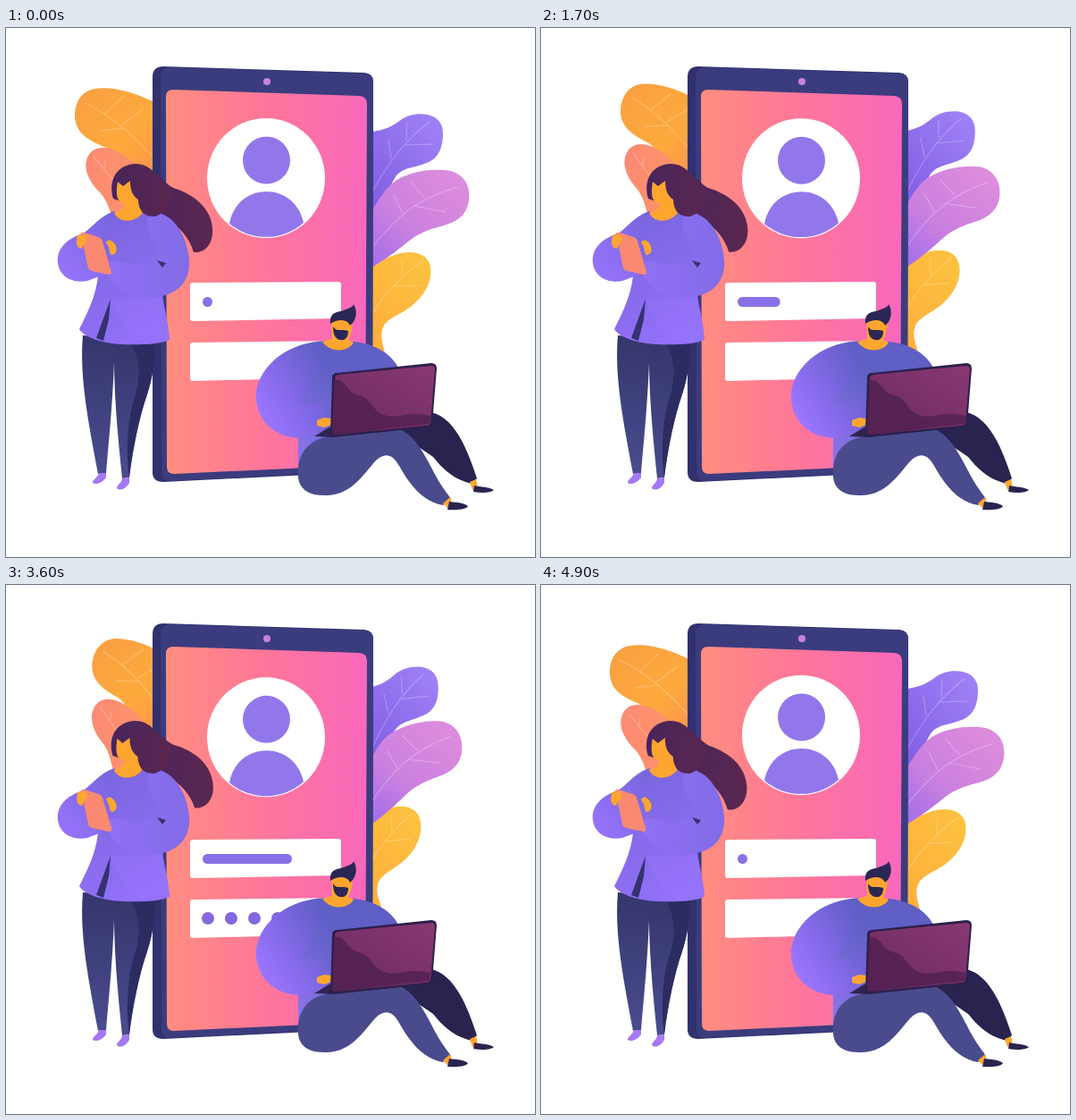
Write an HTML page that moves like this. It is 592 px wide and 592 px high and loops after 5000 ms.

```html
<!DOCTYPE html>
<html lang="en">
<head>
<meta charset="utf-8">
<title>Sign in</title>
<style>
html, body { margin: 0; width: 100%; height: 100%; overflow: hidden; background: #fff; }
svg { display: block; width: 100vw; height: 100vh; }
.vein { fill: none; stroke: #fff; stroke-opacity: .28; stroke-width: 1; stroke-linecap: round; }
.skin { fill: #fca62f; }
</style>
</head>
<body>
<svg viewBox="0 0 592 592">
<defs>
  <linearGradient id="screen"><stop stop-color="#ff8d7f"/><stop offset=".5" stop-color="#ff769b"/><stop offset="1" stop-color="#f968bc"/></linearGradient>
  <linearGradient id="orange" x2="1" y2="1"><stop stop-color="#f99f42"/><stop offset=".55" stop-color="#fdaa3c"/><stop offset="1" stop-color="#ff8b52"/></linearGradient>
  <linearGradient id="coral"><stop stop-color="#fb8a74"/><stop offset="1" stop-color="#ff9862"/></linearGradient>
  <linearGradient id="violet" x1="0" y1="1" x2="1" y2="0"><stop stop-color="#7856df"/><stop offset="1" stop-color="#a284f8"/></linearGradient>
  <linearGradient id="pink" x1="0" y1="1" x2="1" y2="0"><stop stop-color="#9668ee"/><stop offset=".45" stop-color="#cb80df"/><stop offset="1" stop-color="#e08fdc"/></linearGradient>
  <linearGradient id="yellow" x1="0" y1="1" x2="1" y2="0"><stop stop-color="#ffac3b"/><stop offset="1" stop-color="#fcc340"/></linearGradient>
  <linearGradient id="hair"><stop stop-color="#48245c"/><stop offset="1" stop-color="#5a274f"/></linearGradient>
  <linearGradient id="trousers" x2="0" y2="1"><stop stop-color="#35366d"/><stop offset="1" stop-color="#494c8e"/></linearGradient>
  <linearGradient id="blouse" x2=".4" y2="1"><stop stop-color="#7865db"/><stop offset="1" stop-color="#9270f8"/></linearGradient>
  <linearGradient id="sleeve" x1="1" x2="0" y2="1"><stop stop-color="#7664dc"/><stop offset="1" stop-color="#9a74ff"/></linearGradient>
  <linearGradient id="forearm"><stop stop-color="#9070f6"/><stop offset="1" stop-color="#826ce6"/></linearGradient>
  <linearGradient id="body" x1="0" y1="1" x2=".5" y2=".3"><stop stop-color="#9377f2"/><stop offset="1" stop-color="#5f5fc5"/></linearGradient>
  <linearGradient id="arm" x1=".1" y1=".8" x2=".9" y2=".2"><stop stop-color="#9b75ff"/><stop offset=".5" stop-color="#8068e4"/><stop offset="1" stop-color="#605fc6"/></linearGradient>
  <linearGradient id="laptop" x1="0" y1="1" x2="1" y2="0"><stop stop-color="#6b2a61"/><stop offset="1" stop-color="#893872"/></linearGradient>
</defs>

<g id="leafOrange">
  <path fill="url(#orange)" d="M185 94C150 72 120 65 99 68C83 71 76 85 77 101C79 120 96 127 110 133C122 139 124 150 135 156C147 163 158 164 185 170Z"/>
  <path class="vein" d="M88 84C120 99 145 123 169 150M110 97L132 76M129 109L153 91M106 115L132 112"/>
</g>
<g id="leafCoral">
  <path fill="url(#coral)" d="M175 180C158 164 145 150 130 141C113 131 97 131 91 145C86 158 93 172 105 184C115 195 115 204 120 213L170 225Z"/>
  <path class="vein" d="M98 144L132 185M110 158L111 149"/>
</g>
<g id="leafViolet">
  <path fill="url(#violet)" d="M395 118C422 115 429 112 439 105C449 97 460 95 472 97C485 100 490 109 489 121C488 139 481 148 468 152C454 157 445 156 437 165C428 178 422 203 395 224Z"/>
  <path class="vein" d="M474 105C445 127 428 151 410 183M448 125L449 106M431 146L428 124M447 131L477 130"/>
</g>
<g id="leafYellow">
  <path fill="url(#yellow)" d="M395 273C414 264 424 257 438 253C455 248 472 252 475 267C478 286 466 302 453 312C439 322 426 325 422 335C418 345 422 354 424 364L395 364Z"/>
  <path class="vein" d="M467 260C442 278 424 297 409 321M443 279L443 260M434 289L462 288"/>
</g>
<g id="leafPink">
  <path fill="url(#pink)" d="M395 226C411 205 421 180 439 169C458 159 480 157 498 160C514 165 520 178 518 193C516 209 505 217 490 221C470 226 460 231 450 239C438 249 424 260 395 276Z"/>
  <path class="vein" d="M506 178C465 188 436 211 409 247M468 190L453 172M444 207L434 187M456 199L492 206"/>
</g>

<path fill="#30316d" d="M164 55Q164 43 176 43L401 50Q411 51 411 60L410 465L380 498L176 508Q164 508 164 497Z"/>
<path fill="#3b3c7e" d="M173 55Q173 45 183 44L401 51Q411 52 411 60L410 465L380 497L182 507Q175 507 174 498Z"/>
<path fill="url(#screen)" d="M179 77Q179 69 187 69L396 76Q404 77 404 85L402 465L380 490L188 499Q180 499 180 491Z"/>
<circle cx="292" cy="60" r="4" fill="#c783df"/>
<g id="avatar">
  <ellipse cx="291" cy="168" rx="66" ry="67" fill="#fff"/>
  <g fill="#9277eb"><circle cx="291.5" cy="148" r="26.5"/>
  <path d="M250 219C254 196 272 183 291 183C312 183 328 196 333 218A64.5 65.5 0 0 1 250 219Z"/></g>
</g>
<path fill="#fff" d="M206 288Q206 285 209 285L372 284Q375 284 375 287L375 322Q375 325 372 325L209 328Q206 328 206 325Z"/>
<path fill="#fff" d="M206 355Q206 352 209 352L375 350V391L209 395Q206 395 206 392Z"/>
<rect id="bar" x="220" y="301" width="11" height="11" rx="5.5" fill="#8a70e6"/>
<g id="dots" fill="#8468df"></g>

<!-- standing woman -->
<path fill="url(#trousers)" d="M86 344C82 390 92 440 103 499H112C115 460 120 420 122 346Z"/>
<path fill="url(#trousers)" d="M121 350C120 405 125 455 130 504L138 503C142 470 149 436 158 410C165 388 167 370 166 349Z"/>
<path fill="#2b2c61" d="M140 353H166C167 370 165 388 158 410C149 436 142 470 138 503C134 475 136 442 142 420C151 394 151 373 140 353Z"/>
<path fill="#a578f4" d="M104 498H112V503C109 508 101 512 97 509C97 505 103 503 104 498ZM130 504L138 503V509C135 515 128 519 124 515C124 511 130 509 130 504Z"/>
<path id="tail" fill="url(#hair)" d="M138 156C164 148 172 171 188 180C209 187 230 203 230 228C230 245 219 254 208 252C204 237 194 223 178 215L150 208Z"/>
<path fill="url(#blouse)" d="M121 205C108 211 98 221 90 230L103 277C101 299 91 319 82 337C88 347 110 353 130 354C150 355 170 354 183 349C182 330 177 315 175 299L200 260C198 230 192 214 172 207L150 207C142 216 130 217 121 205Z"/>
<path fill="#9b78ff" opacity=".28" d="M118 304C122 323 136 346 158 354C170 353 178 352 183 349C182 330 177 315 175 299C154 305 136 300 118 304Z"/>
<path fill="url(#sleeve)" d="M121 205C104 211 96 224 86 230C67 236 56 248 58 263C60 279 75 286 91 283L115 274L106 236C113 226 120 215 121 205Z"/>
<path fill="url(#forearm)" d="M160 209C187 205 202 230 205 259C207 288 187 301 160 302C137 302 122 290 113 275L117 261C137 264 157 266 171 261C170 242 153 228 160 209Z"/>
<path fill="#34326f" d="M169 260L179 263L175 268ZM117 303L101 347L109 350L115 326Z"/>
<g id="head">
  <path fill="url(#hair)" d="M120 191C114 170 124 153 145 152C164 152 170 169 181 177C190 183 180 209 166 211C158 211 153 208 149 201Z"/>
  <path class="skin" d="M125 172L131 177L139 171C139 182 142 188 148 192C148 198 150 203 153 207C144 218 127 219 121 207C128 205 133 203 133 196C123 196 123 184 125 172Z"/>
</g>
<g id="tablet">
  <path fill="#f98970" d="M82 230Q83 228 86 229L102 234Q105 235 106 238L116 272Q117 276 113 276L95 272Q91 271 90 268Z"/>
  <path class="skin" d="M78 232L86 231C90 234 90 238 86 241L83 247C79 247 77 243 77 240Z"/>
</g>
<path id="thumb" class="skin" d="M112 243C115 238 120 241 123 247C125 253 122 257 118 257C115 254 117 250 112 243Z"/>

<!-- seated man -->
<path fill="#28244f" d="M437 452L476 430C500 436 514 464 527 504L521 510C505 506 492 498 478 480Z"/>
<path class="skin" d="M519 508L526 505L528 514L522 517Z"/>
<path fill="#292450" d="M523 519L524 512C532 514 539 513 546 517C543 520 533 521 523 519Z"/>
<path fill="url(#body)" d="M340 354L390 351C415 354 432 366 439 380L441 455L327 496L327 450L320 430Z"/>
<path fill="url(#arm)" d="M358 350C319 351 284 375 280 408C278 439 301 459 330 459L362 451L365 413C349 419 336 421 329 416C344 399 351 373 358 350Z"/>
<path fill="#494b8d" d="M327 502C325 470 345 456 375 456L441 449C461 459 470 481 482 503C488 514 494 521 498 527L489 534C468 530 454 515 440 490C432 476 423 475 413 485C400 500 386 522 360 523C340 524 328 517 327 502Z"/>
<path class="skin" d="M489 532L497 525L499 533L494 537Z"/>
<path fill="#292450" d="M494 539L496 530C504 531 512 531 517 535C515 539 504 540 494 539Z"/>
<path class="skin" d="M364 326L387 327C389 336 386 342 383 349L389 352C383 363 363 364 354 351L365 348Z"/>
<path fill="#2b2754" d="M363 331C362 316 372 319 380 315C386 313 389 311 389 309C395 319 390 330 385 333C382 326 372 325 363 331ZM366 334C370 341 375 336 383 339C383 346 380 350 374 349C368 348 366 342 366 334Z"/>
<path fill="#302551" d="M345 457L363 446L366 458Z"/>
<path id="hand" class="skin" d="M348 438L356 435L364 436V443L356 446L348 444Z"/>
<path fill="#2d204d" d="M365 391Q365 386 371 386L476 375Q482 375 482 381L477 443Q476 447 471 447L366 458Q362 458 363 453Z"/>
<path fill="url(#laptop)" d="M368 392Q368 389 372 388L476 378Q480 378 480 382L475 442Q474 445 470 445L368 455Q365 455 365 451Z"/>
<path fill="#4b1f4e" opacity=".7" d="M367 394C381 392 380 407 394 411C409 413 408 427 423 433C438 439 448 427 475 434L474 443L368 455Q365 455 365 451Z"/>
</svg>
<script>
const LOOP = 5000, STEP = 100;
const get = id => document.getElementById(id);
const clamp = v => Math.max(0, Math.min(1, v));
// 0..1 wave that is 1 at time "peak"
const wave = (t, period, peak) => (1 + Math.cos(2 * Math.PI * (t - peak) / period)) / 2;
const place = (id, value) => get(id).setAttribute("transform", value);

// id, swing in degrees, pivot
const leaves = [
  ["leafOrange", 7.2, 175, 250],
  ["leafCoral", 6, 172, 215],
  ["leafViolet", -4.5, 400, 185],
  ["leafPink", -5.2, 410, 274],
  ["leafYellow", -5, 410, 400]
];

const dots = [226, 252, 278, 304, 330].map(x => {
  const dot = document.createElementNS("http://www.w3.org/2000/svg", "circle");
  dot.setAttribute("cx", x);
  dot.setAttribute("cy", 373);
  get("dots").append(dot);
  return dot;
});

// grows from nothing, overshoots, then settles
function pop(v) {
  if (v <= 0) return 0;
  return v < .6 ? v / .6 * 1.18 : 1 + .18 * clamp((1 - v) / .4);
}

function draw(t) {
  const sway = wave(t, LOOP / 2, 1175);
  for (const [id, angle, x, y] of leaves) place(id, `rotate(${angle * sway} ${x} ${y})`);
  place("avatar", `translate(0 ${2.4 * wave(t, LOOP / 2, 1050) ** 3})`);

  const beat = LOOP / 3;
  const nod = wave(t, beat, 880), tap = nod ** 3;
  const lag = 2 * wave(t, beat, 400) - 1;
  place("head", `translate(${-3.2 * nod} 0)`);
  place("tail", `translate(${-3.2 * nod} 0) rotate(${-1.5 - 2 * lag} 165 185)`);
  place("tablet", `translate(${2.2 * (2 * wave(t, beat, 180) - 1)} 0)`);
  place("thumb", `translate(${-2 * tap} ${-3 + 17 * tap})`);
  place("hand", `translate(${tap} ${1 - 12 * tap}) rotate(${-14 * tap} 356 440)`);

  const typing = t < 4700;
  get("bar").setAttribute("width", typing ? 11 + 89 * clamp((t - 1230) / 1140) : 11);
  dots.forEach((dot, i) =>
    dot.setAttribute("r", typing ? 7 * pop((t - 2360 - i * 180) / 400) : 0));
}

function frame(now) {
  draw(Math.floor(now % LOOP / STEP) * STEP);
  requestAnimationFrame(frame);
}
draw(0);
requestAnimationFrame(frame);
</script>
</body>
</html>
```
